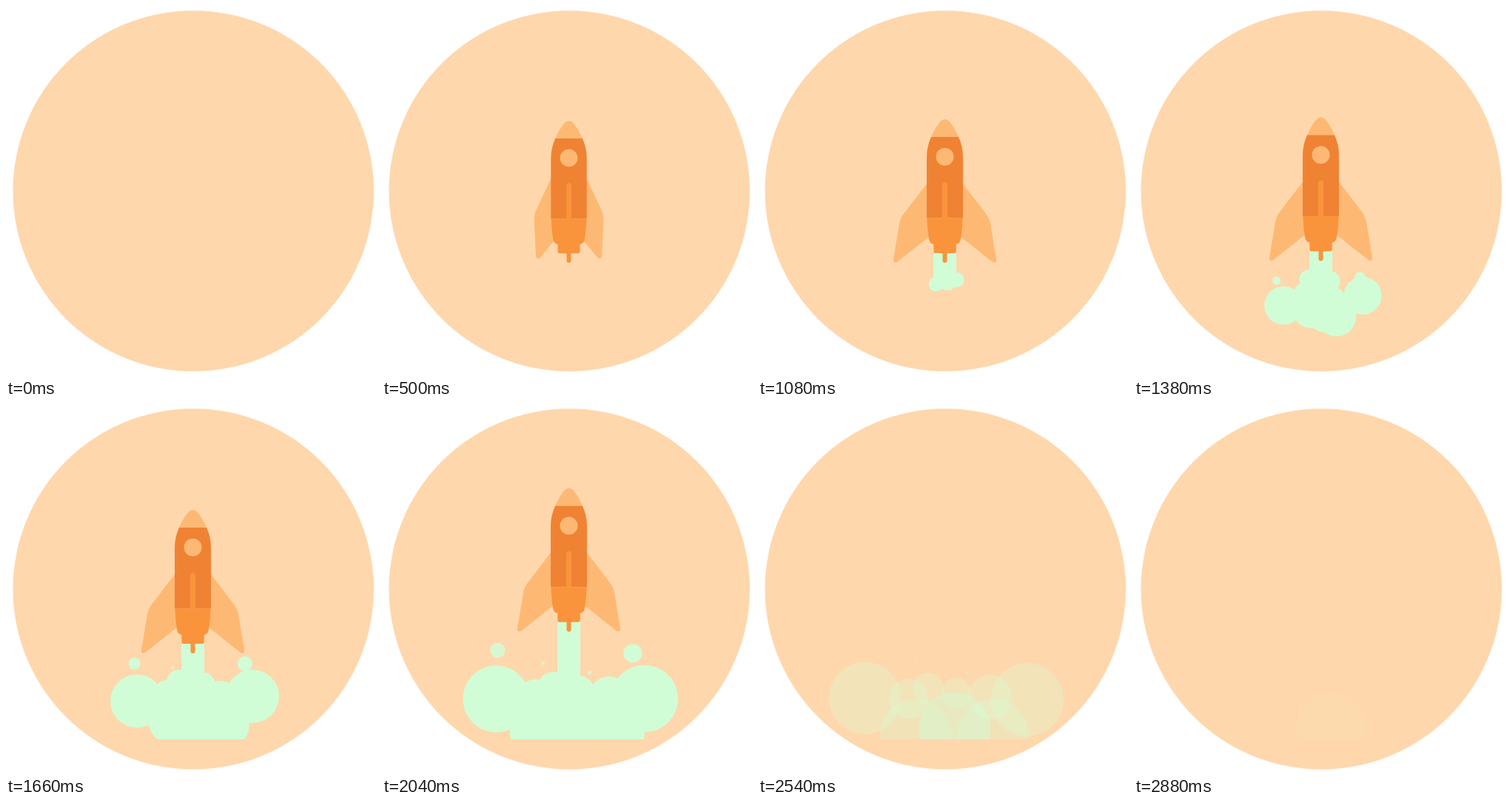
These frames come from a looping animation (500 by 500 pixels, 3.04 s). An HTML page with a canvas:

```html
<!DOCTYPE html>
<html lang="en">
<head>
<meta charset="utf-8">
<title>Rocket launch</title>
<style>
  html, body { margin: 0; width: 100%; height: 100%; overflow: hidden; background: #fff; }
  canvas { display: block; width: 500px; height: 500px; }
</style>
</head>
<body>
<canvas id="stage" width="500" height="500"></canvas>
<script>
const ctx = document.getElementById('stage').getContext('2d');
const LOOP = 3040, IGNITE = 1080, GONE = 2380, GROUND = 453, MID = 252.5;
const SKY = '#ffd7ac', PALE = '#fdb974', DARK = '#ef8333', ORANGE = '#fa943c', SMOKE = '#d0fdd6';

const clamp = v => Math.min(1, Math.max(0, v));
const span = (t, from, to) => clamp((t - from) / (to - from));
const easeOut = p => 1 - (1 - p) ** 2;
const mix = (a, b, p) => a + (b - a) * p;

// Puffs at the nozzle when the smoke first appears: x, y, radius
const seeds = [[240.5, 376, 9.5], [256, 372, 12], [268.5, 370, 9.8]];

// Each cloud: early pose, late pose, fade start, fade end, seed
const clouds = [
  { a: [228, 426, 36], b: [213, 447, 48], fade: [2270, 2640], seed: 0 },
  { a: [293, 432, 36], b: [317, 447, 48], fade: [2270, 2640], seed: 2 },
  { a: [177, 401.5, 36], b: [145.5, 397.5, 48.5], fade: [2290, 2640], seed: 0 },
  { a: [333, 395, 36], b: [363, 399.5, 49], fade: [2290, 2640], seed: 2 },
  { a: [218, 392, 19], b: [204, 398.5, 27], fade: [2290, 2640], seed: 0 },
  { a: [290, 394, 20], b: [313, 396, 30], fade: [2290, 2640], seed: 2 },
  { a: [234, 376, 17], b: [230, 384, 21], fade: [2290, 2640], seed: 1 },
  { a: [266, 380, 17], b: [268, 390, 20.5], fade: [2290, 2640], seed: 1 },
  { a: [173.5, 351, 8], b: [149.5, 326, 11], fade: [1960, 2460], seed: 0 },
  { a: [323, 351, 10], b: [345, 331.5, 13.5], fade: [2220, 2500], seed: 2 },
  { a: [225, 357, 1.8], b: [215, 348, 2.3], fade: [2330, 2640], seed: 1 },
  { a: [273, 365, 2], b: [283.5, 362, 2.5], fade: [2330, 2640], seed: 1 },
  { a: [262, 425, 36], b: [266, 438, 48], fade: [2380, 2660], seed: 1, rest: 0.05 }
];

function disc(x, y, r, color) {
  if (r <= 0) return;
  ctx.fillStyle = color;
  ctx.beginPath();
  ctx.arc(x, y, r, 0, Math.PI * 2);
  ctx.fill();
}

function block(x, y, w, h, radii, color) {
  ctx.fillStyle = color;
  ctx.beginPath();
  ctx.roundRect(x, y, w, h, radii);
  ctx.fill();
}

function shape(d, color) {
  ctx.fillStyle = color;
  ctx.fill(new Path2D(d));
}

const spread = t => 1 - ((2500 - Math.min(t, 2500)) / 1420) ** 2;
const Q1 = spread(1660), Q2 = spread(2360);

function cloudPose(c, t) {
  const seed = seeds[c.seed];
  if (t < IGNITE) {
    const g = easeOut(span(t, 880, IGNITE));
    return [mix(MID, seed[0], g), mix(336, seed[1], g), seed[2] * g];
  }
  const k = (spread(t) - Q1) / (Q2 - Q1);
  const free = easeOut(span(t, IGNITE, IGNITE + 300));
  return c.a.map((v, i) => mix(seed[i], mix(v, c.b[i], k), free));
}

function drawSmoke(t) {
  if (t <= 880) return;
  ctx.save();
  ctx.beginPath();
  ctx.rect(0, 0, 500, GROUND);
  ctx.clip();
  for (const c of clouds) {
    const [x, y, r] = cloudPose(c, t);
    ctx.globalAlpha = mix(1, c.rest || 0, span(t, ...c.fade));
    disc(x, y, r, SMOKE);
  }
  ctx.restore();
}

function drawJet(t, lift) {
  if (t <= 880) return;
  const g = easeOut(span(t, 880, IGNITE));
  const end = mix(334, 373, g) + 60 * span(t, IGNITE, IGNITE + 220);
  ctx.fillStyle = SMOKE;
  ctx.fillRect(237, 330 - lift, 31, end - 330 + lift);
}

function drawWing(angle) {
  ctx.save();
  ctx.beginPath();
  ctx.rect(0, 0, MID, 500);
  ctx.clip();
  ctx.translate(174, 226);
  ctx.rotate(-angle * Math.PI / 180);
  ctx.translate(-174, -226);
  shape('M240 224.5 L197.500 280 Q192.500 286 190.800 295 L183 342 Q182.600 348.500 188 346 L231 312 L246 300 Z', PALE);
  ctx.restore();
}

function drawRocket(t, lift) {
  const size = easeOut(span(t, 0, 560));
  if (size <= 0) return;
  const angle = 42.6 * (1 - span(t, 0, IGNITE)) ** 2;
  ctx.save();
  ctx.translate(MID, 347 - lift);
  ctx.scale(size, size);
  ctx.translate(-MID, -347);

  drawWing(angle);
  ctx.save();
  ctx.translate(2 * MID, 0);
  ctx.scale(-1, 1);
  drawWing(angle);
  ctx.restore();

  shape('M233.700 177.500 Q239 165 246 156.500 Q249 153 252.500 153 Q256 153 259 156.500 Q266 165 271.300 177.500 Z', PALE);
  shape('M234 177 H271 Q277 190 277 204 V286.500 H228 V204 Q228 190 234 177 Z', DARK);
  shape('M228.400 286.500 H276.600 Q276 303 274 315 Q273 321.500 267 322 H238 Q232 321.500 231 315 Q229 303 228.400 286.500 Z', ORANGE);
  block(237.3, 320, 30.4, 14, [0, 0, 2.5, 2.5], ORANGE);
  block(249, 238, 7, 49, [3.5, 3.5, 0, 0], ORANGE);
  block(249.5, 331, 6, 16, [0, 0, 3, 3], ORANGE);
  disc(MID, 203.7, 12, PALE);
  ctx.restore();
}

function draw(t) {
  ctx.fillStyle = '#fff';
  ctx.fillRect(0, 0, 500, 500);
  disc(253.2, 250, 243.8, SKY);
  drawSmoke(t);
  if (t < GONE) {
    const u = span(t, IGNITE, 2360);
    const lift = 42.9 * u ** 2 + 63.6 * u ** 5;
    drawJet(t, lift);
    drawRocket(t, lift);
  }
}

let start;
function tick(now) {
  if (start === undefined) start = now;
  const t = Math.max(0, now - start) % LOOP;
  draw(Math.floor(t / 20) * 20);
  requestAnimationFrame(tick);
}
draw(0);
requestAnimationFrame(tick);
</script>
</body>
</html>
```
